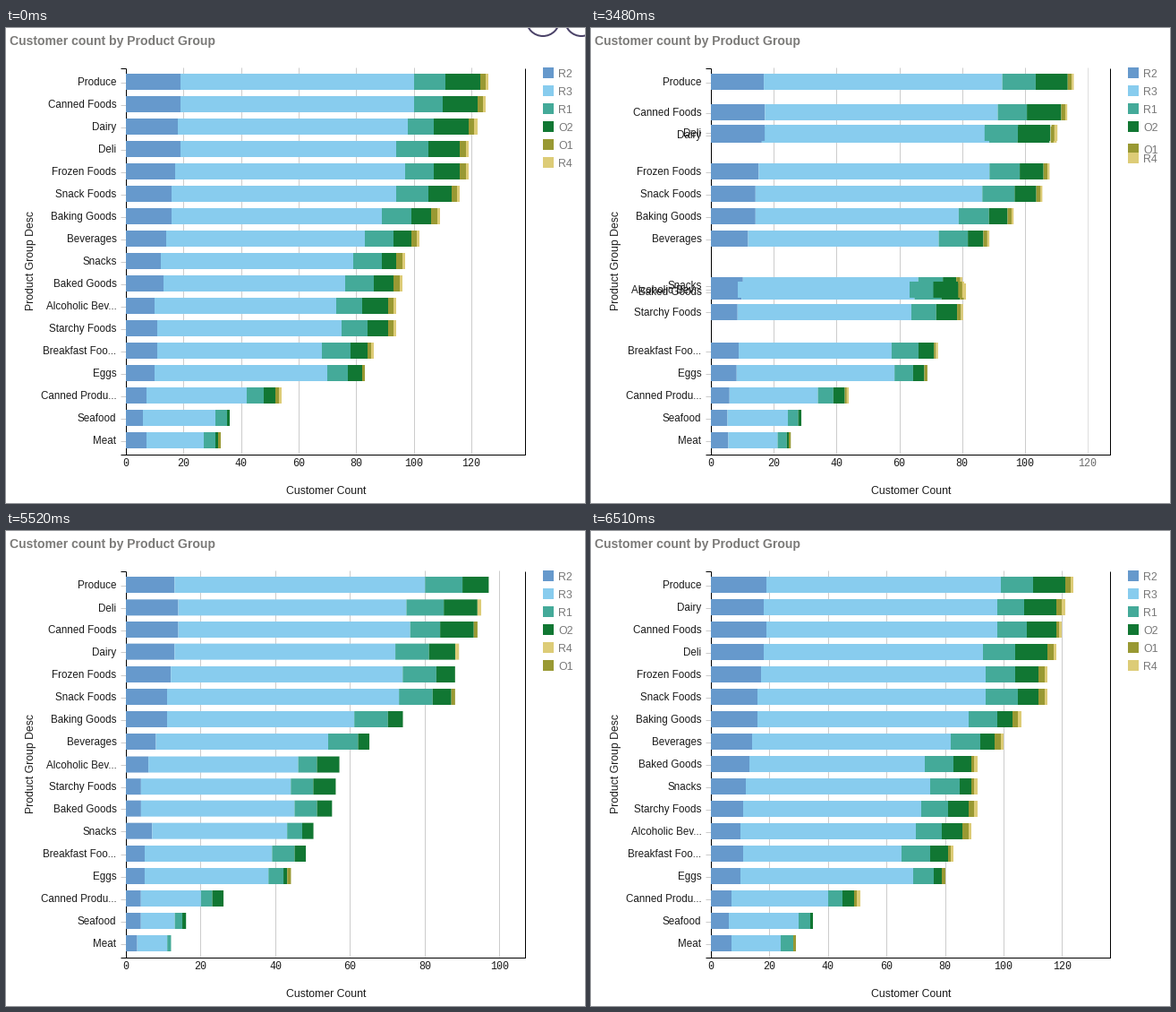
Animation, 647 px wide and 530 px high, one loop 7.99 s. Source, as a matplotlib script:

```python
import math

import matplotlib.pyplot as plt
import numpy as np
from matplotlib.animation import FuncAnimation
from matplotlib.collections import LineCollection, PolyCollection
from matplotlib.patches import Circle, Rectangle

W, H, DPI = 647, 530, 64
LOOP, FRAMES = 7990, 235
INTERVAL = LOOP // FRAMES
PX = 72 / DPI

LEFT, RIGHT, TOP, BOTTOM = 134, 580, 44, 475
ROW_0, ROW_STEP, BAR_H = 60, 25, 18
KEY_0, KEY_STEP, KEY_SIZE = 50, 20, 12
TICKS = np.arange(0, 140, 20)

SERIES = ["R2", "R3", "R1", "O2", "O1", "R4"]
COLORS = ["#6699cc", "#88ccee", "#44aa99", "#117733", "#999933", "#ddcc77"]

# Segment widths per group, largest total first; the last two may be left
# out when they equal the usual tail.
FIRST = {
    "Produce": (19, 81, 11, 12),
    "Canned Foods": (19, 81, 10, 12),
    "Dairy": (18, 80, 9, 12),
    "Deli": (19, 75, 11, 11),
    "Frozen Foods": (17, 80, 10, 9),
    "Snack Foods": (16, 78, 11, 8),
    "Baking Goods": (16, 73, 10, 7),
    "Beverages": (14, 69, 10, 6),
    "Snacks": (12, 67, 10, 5),
    "Baked Goods": (13, 63, 10, 7),
    "Alcoholic Bev...": (10, 63, 9, 9),
    "Starchy Foods": (11, 64, 9, 7),
    "Breakfast Foo...": (11, 57, 10, 6, 1, 1),
    "Eggs": (10, 60, 7, 5, 1, 0),
    "Canned Produ...": (7, 35, 6, 4, 1, 1),
    "Seafood": (6, 25, 4, 1, 0, 0),
    "Meat": (7, 20, 4, 1, 1, 0),
}
SECOND = {
    "Produce": (13, 67, 10, 7),
    "Deli": (14, 61, 10, 9, 0, 1),
    "Canned Foods": (14, 62, 8, 9, 1, 0),
    "Dairy": (13, 59, 9, 7, 0, 1),
    "Frozen Foods": (12, 62, 9, 5),
    "Snack Foods": (11, 62, 9, 5, 1, 0),
    "Baking Goods": (11, 50, 9, 4),
    "Beverages": (8, 46, 8, 3),
    "Alcoholic Bev...": (6, 40, 5, 6),
    "Starchy Foods": (4, 40, 6, 6),
    "Baked Goods": (4, 41, 6, 4),
    "Snacks": (7, 36, 4, 3),
    "Breakfast Foo...": (5, 34, 6, 3),
    "Eggs": (5, 33, 4, 1, 1, 0),
    "Canned Produ...": (4, 16, 3, 3),
    "Seafood": (4, 9, 2, 1),
    "Meat": (3, 8, 1, 0),
}
THIRD = {
    "Produce": (19, 80, 11, 11),
    "Dairy": (18, 80, 9, 11),
    "Canned Foods": (19, 79, 10, 10, 1, 1),
    "Deli": (18, 75, 11, 11),
    "Frozen Foods": (17, 77, 10, 8),
    "Snack Foods": (16, 78, 11, 7),
    "Baking Goods": (16, 72, 10, 5),
    "Beverages": (14, 68, 10, 5),
    "Baked Goods": (13, 60, 10, 6, 1, 1),
    "Snacks": (12, 63, 10, 4, 1, 1),
    "Starchy Foods": (11, 61, 9, 7),
    "Alcoholic Bev...": (10, 60, 9, 7),
    "Breakfast Foo...": (11, 54, 10, 6, 1, 1),
    "Eggs": (10, 59, 7, 3, 1, 0),
    "Canned Produ...": (7, 33, 5, 4, 1, 1),
    "Seafood": (6, 24, 4, 1, 0, 0),
    "Meat": (7, 17, 4, 0, 1, 0),
}
NAMES = list(FIRST)


def make_state(table, tail, order):
    """Bar edges, row positions, axis maximum and legend positions."""
    edges = np.zeros((len(NAMES), len(SERIES), 2))
    for row, name in enumerate(NAMES):
        widths = table[name]
        if len(widths) == 4:
            widths = widths + tail
        widths = np.array(widths)[order]
        stops = np.cumsum(widths)
        edges[row, order, 0] = stops - widths
        edges[row, order, 1] = stops
    ranks = list(table)
    return {
        "edges": edges,
        "rows": np.array([ROW_0 + ROW_STEP * ranks.index(n) for n in NAMES]),
        "limit": 1.1 * edges.max(),
        "keys": np.array([KEY_0 + KEY_STEP * order.index(s)
                          for s in range(len(SERIES))]),
    }


STATES = [
    make_state(FIRST, (2, 1), [0, 1, 2, 3, 4, 5]),
    make_state(SECOND, (0, 0), [0, 1, 2, 3, 5, 4]),
    make_state(THIRD, (2, 1), [0, 1, 2, 3, 4, 5]),
]
# start ms, step ms, phase of the first step, lag of rows, lag of bars
MOVES = [(3100, 77, 1.0, 0.15, 0.15), (5520, 76, 0.5, 0.07, 0.39)]
STEPS = 14


def ease(u, power, lag):
    odds = (u / (1 - u)) ** power * math.exp(-lag)
    return odds / (1 + odds)


def phase(t):
    """States to blend, and progress of rows, bars and legend."""
    for i, (start, step, shift, row_lag, bar_lag) in enumerate(MOVES):
        if t < start:
            return STATES[i], STATES[i], 0, 0, 0
        k = int((t - start) // step)
        if k < STEPS - 1:
            u = (k + shift) / STEPS
            return (STATES[i], STATES[i + 1], ease(u, 1.475, row_lag),
                    ease(u, 1.475, bar_lag), ease(u, 3, 0.25))
    return STATES[-1], STATES[-1], 0, 0, 0


def mix(a, b, p):
    return a + (b - a) * p


fig = plt.figure(figsize=(W / DPI, H / DPI), dpi=DPI, facecolor="white")
ax = fig.add_axes([0, 0, 1, 1])
ax.set_xlim(0, W)
ax.set_ylim(H, 0)
ax.axis("off")


def label(x, y, text, size, color="#1a1a1a", font="Liberation Sans", **kw):
    kw.setdefault("va", "baseline")
    return ax.text(x, y, text, fontsize=size * PX, color=color,
                   family=font, **kw)


def lines(segments, color, z):
    art = LineCollection(segments, colors=color, linewidths=PX, zorder=z)
    ax.add_collection(art)
    return art


label(4.5, 19, "Customer count by Product Group", 14, "#7b7a78",
      weight="bold")
label(358, 520.5, "Customer Count", 12.2, ha="center")
label(28.5, 259.5, "Product Group Desc", 12.2, rotation=90,
      ha="center", va="center")

x0, x1, y0, y1 = LEFT - 0.5, RIGHT - 0.5, TOP + 0.5, BOTTOM + 0.5
lines([[(x0, y0), (x0, y1), (x1, y1), (x1, y0)],
       [(LEFT - 6, y0), (x0, y0)], [(LEFT - 6, y1), (x0, y1)]], "black", 2)

grid = lines([], "#cccccc", 1)
row_ticks = lines([], "#cccccc", 1)
bars = PolyCollection([], facecolors=COLORS * len(NAMES), edgecolors="none",
                      linewidths=0, zorder=3)
bars.set_snap(False)
ax.add_collection(bars)

row_labels = [label(123.5, 0, n, 11.6, ha="right") for n in NAMES]
tick_labels = [label(0, 489, str(v), 11.6, font="Liberation Mono",
                     ha="center") for v in TICKS]
key_labels = [label(617, 0, s, 12.4, "#777777") for s in SERIES]
key_boxes = [ax.add_patch(Rectangle((600, 0), KEY_SIZE, KEY_SIZE, fc=c,
                                    lw=0, zorder=3)) for c in COLORS]
buttons = [ax.add_patch(Circle((x, -9.5), 18.5, fc="white", ec="#4b4368",
                               lw=2 * PX, zorder=4)) for x in (600, 643)]


def draw_axis(a, b, p, scale):
    segments, colors = [], []
    for v, text in zip(TICKS, tick_labels):
        x = LEFT + v * scale
        alpha = mix(float(v <= a["limit"]), float(v <= b["limit"]), p)
        shown = x <= RIGHT and alpha > 0
        text.set_visible(shown)
        text.set_x(x)
        text.set_alpha(alpha)
        if shown and v:
            xs = round(x) - 0.5
            segments.append([(xs, TOP), (xs, BOTTOM)])
            colors.append((0.8, 0.8, 0.8, alpha))
    grid.set_segments(segments)
    grid.set_color(colors)


def draw(i):
    # Each frame shows the state reached by its end.
    t = (i + 1) * INTERVAL - 1
    a, b, p_row, p_bar, p_key = phase(t)

    scale = (RIGHT - LEFT) / mix(a["limit"], b["limit"], p_bar)
    draw_axis(a, b, p_bar, scale)

    edges = LEFT + scale * mix(a["edges"], b["edges"], p_bar)
    if a is b:
        edges = np.round(edges)
    rows = mix(a["rows"], b["rows"], p_row)
    polys = []
    for y, row in zip(rows, edges):
        top, low = y - BAR_H / 2, y + BAR_H / 2
        polys += [[(l, top), (r, top), (r, low), (l, low)] for l, r in row]
    bars.set_verts(polys)
    row_ticks.set_segments([[(LEFT - 6, y + 0.5), (LEFT, y + 0.5)]
                            for y in rows])
    for text, y in zip(row_labels, rows):
        text.set_y(y + 4.2)

    keys = mix(a["keys"], b["keys"], p_key)
    for text, box, y in zip(key_labels, key_boxes, keys):
        text.set_y(y + 5)
        box.set_y(y - KEY_SIZE / 2)

    # The hover buttons fade out shortly after the start.
    for button in buttons:
        button.set_visible(t < 450)
        button.set_alpha(1 if t < 380 else 0.5)
    return []


anim = FuncAnimation(fig, draw, frames=FRAMES, interval=INTERVAL,
                     init_func=lambda: [], repeat=True, repeat_delay=0)
plt.show()
```
